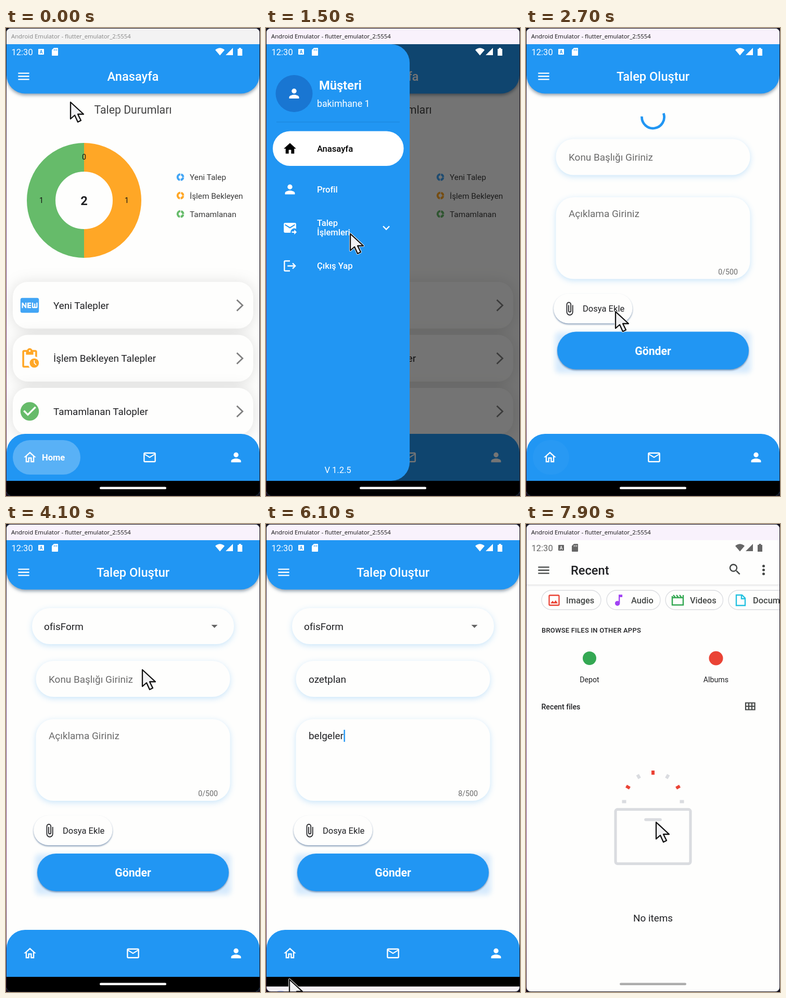
Write an HTML page that moves like this. It is 488 px wide and 896 px high and loops after 8 s.

```html
<!DOCTYPE html>
<html lang="tr">
<head>
<meta charset="utf-8">
<title>Talep</title>
<style>
html, body { margin: 0; width: 100%; height: 100%; overflow: hidden; background: #15101c; }
svg { display: block; width: 488px; height: 896px; font-family: Roboto, sans-serif; }
text { white-space: pre; }
.head { filter: drop-shadow(0 3px 3px rgba(30, 60, 90, .5)); }
.card { filter: drop-shadow(0 2px 14px rgba(0, 0, 0, .13)); }
.glow { filter: drop-shadow(0 3px 6px rgba(33, 150, 243, .24)); }
.lift { filter: drop-shadow(0 2px 1.5px rgba(40, 80, 130, .55)); }
.halo { filter: blur(5px); }
</style>
</head>
<body>
<svg id="stage" viewBox="0 0 488 896"></svg>
<script>
const BLUE = '#2196f3', PAGE = '#fefefd', INK = '#202124', GREY = '#6b6b6b';
const GREEN = '#66bb6a', ORANGE = '#ffa726', KEY = '#1b1b1f', U = 1.1825, ROUND = 35.5;

const PATHS = {
  menu: 'M3 18h18v-2H3zM3 13h18v-2H3zM3 6v2h18V6z',
  home: 'M10 20v-6h4v6h5v-8h3L12 3 2 12h3v8z',
  homeLine: 'M12 5.69l5 4.5V18h-2v-6H9v6H7v-7.81zM12 3L2 12h3v8h6v-6h2v6h6v-8h3z',
  mail: 'M22 6c0-1.1-.9-2-2-2H4c-1.1 0-2 .9-2 2v12c0 1.1.9 2 2 2h16c1.1 0 2-.9 2-2zm-2 0l-8 5-8-5zm0 12H4V8l8 5 8-5z',
  person: 'M12 12a4 4 0 1 0 0-8 4 4 0 0 0 0 8zm0 2c-2.67 0-8 1.34-8 4v2h16v-2c0-2.66-5.33-4-8-4z',
  forward: 'M20 4H4c-1.1 0-2 .9-2 2v12c0 1.1.9 2 2 2h9v-1a6 6 0 0 1 9-5.2V6c0-1.1-.9-2-2-2zm0 4l-8 5-8-5V6l8 5 8-5zm-1 7l4 4-4 4v-3h-4v-2h4z',
  exit: 'M17 7l-1.4 1.4L18.2 11H8v2h10.2l-2.6 2.6L17 17l5-5zM4 5h8V3H4c-1.1 0-2 .9-2 2v14c0 1.1.9 2 2 2h8v-2H4z',
  fresh: 'M20 4H4a2 2 0 0 0-2 2v12a2 2 0 0 0 2 2h16a2 2 0 0 0 2-2V6a2 2 0 0 0-2-2zM8.5 15H7.3l-2.55-3.5V15H3.5V9h1.25l2.5 3.5V9H8.5zm5-4.74H11v1.12h2.5v1.26H11v1.11h2.5V15h-4V9h4zm7 3.74a1 1 0 0 1-1 1h-4a1 1 0 0 1-1-1V9h1.25v4.5h1.13V10h1.25v3.5h1.12V9h1.25z',
  pending: 'M17 12a5 5 0 1 0 0 10 5 5 0 0 0 0-10zm1.65 7.35L16.5 17.2V14h1v2.79l1.85 1.85zM18 3h-3.18a3 3 0 0 0-5.64 0H6a2 2 0 0 0-2 2v15a2 2 0 0 0 2 2h6.1a7 7 0 0 1-1.4-2H6V5h2v3h8V5h2v5.08c.7.1 1.4.3 2 .6V5a2 2 0 0 0-2-2zm-6 2a1 1 0 1 1 0-2 1 1 0 0 1 0 2z',
  done: 'M12 2a10 10 0 1 0 0 20 10 10 0 0 0 0-20zm-2 15l-5-5 1.4-1.4 3.6 3.6 7.6-7.6L19 8z',
  clip: 'M16.5 6v11.5a4 4 0 0 1-8 0V5a2.5 2.5 0 0 1 5 0v10.5a1 1 0 0 1-2 0V6H10v9.5a2.5 2.5 0 0 0 5 0V5a4 4 0 0 0-8 0v12.5a5.5 5.5 0 0 0 11 0V6z',
  mic: 'M12 14a3 3 0 0 0 3-3V5a3 3 0 0 0-6 0v6a3 3 0 0 0 3 3zM17 11a5 5 0 0 1-10 0H5a7 7 0 0 0 6 6.9V21h2v-3.1a7 7 0 0 0 6-6.9z',
  search: 'M15.5 14h-.8l-.3-.3a6.5 6.5 0 1 0-.7.7l.3.3v.8l5 5 1.5-1.5zm-6 0a4.5 4.5 0 1 1 0-9 4.5 4.5 0 0 1 0 9z',
  note: 'M12 3v10.55A4 4 0 1 0 14 17V7h4V3z'
};

const icon = (name, x, y, fill = '#fff', k = U) =>
  `<path d="${PATHS[name]}" fill="${fill}" fill-rule="evenodd" transform="translate(${x} ${y}) scale(${k}) translate(-12 -12)"/>`;
// y is the middle of the capitals
const text = (x, y, s, size, fill = '#fff', more = '') =>
  `<text x="${x}" y="${y + size * .355}" font-size="${size}" fill="${fill}" ${more}>${s}</text>`;
const rect = (x, y, w, h, r, fill, more = '') =>
  `<rect x="${x}" y="${y}" width="${w}" height="${h}" rx="${r}" fill="${fill}" ${more}/>`;
const disc = (x, y, r, fill, more = '') => `<circle cx="${x}" cy="${y}" r="${r}" fill="${fill}" ${more}/>`;
const line = (d, stroke, w = 2.4, more = '') =>
  `<path d="${d}" fill="none" stroke="${stroke}" stroke-width="${w}" ${more}/>`;
const group = (id, body, more = '') => `<g id="${id}" ${more}>${body}</g>`;
const MID = 'text-anchor="middle" ', MED = 'font-weight="500" ', BOLD = 'font-weight="700" ';

function homePage() {
  const legend = [['Yeni Talep', '#42a5f5'], ['İşlem Bekleyen', ORANGE], ['Tamamlanan', GREEN]];
  const cards = [['fresh', 'Yeni Talepler', '#42a5f5'], ['pending', 'İşlem Bekleyen Talepler', ORANGE],
    ['done', 'Tamamlanan Talopler', GREEN]];
  const ring = (y, c) => disc(335, y, 5.3, 'none',
    `stroke="${c}" stroke-width="4" stroke-dasharray="6.8 1.5 15.1 1.5 6.8 1.6" stroke-dashoffset="-.8"`);
  return text(244, 156, 'Talep Durumları', 21.28, '#444', MID) +
    line('M150 247.5a82.5 82.5 0 0 1 0 165', ORANGE, 55) + line('M150 247.5a82.5 82.5 0 0 0 0 165', GREEN, 55) +
    text(150, 247, '0', 14.19, '#111', MID) + text(68, 330, '1', 14.19, '#111', MID) +
    text(232, 330, '1', 14.19, '#111', MID) + text(150, 331, '2', 23.65, INK, MID + BOLD) +
    legend.map(([s, c], i) => ring(285.5 + i * 35.3, c) + text(353, 286 + i * 35.3, s, 15.37, '#3a3a3a')).join('') +
    cards.map((c, i) => rect(13, 486 + i * 101.5, 462, 89.5, 29, PAGE, 'class="card"')).join('') +
    cards.map(([n, s, c], i) => {
      const y = 531 + i * 101.5;
      return icon(n, 45.5, y, c, 1.774) + text(91, y, s, 18.92, INK) + line(`M443.5 ${y - 10.5}l11 10.5-11 10.5`, '#808080', 2.8);
    }).join('');
}

function formPage() {
  const field = (x, y, w, h) => rect(x, y, w, h, 34, PAGE, 'class="glow"');
  return rect(0, 31, 488, 836, 0, PAGE) + line('', BLUE, 4.73, 'id="spin"') +
    group('pick', field(50, 161, 388, 69) + text(73, 196, 'ofisForm', 18.92, INK) + '<path d="M394.5 193h12l-6 6z" fill="#666"/>') +
    group('fields',
      field(57.5, 262, 373, 69) + '<g id="subject"></g>' +
      field(57.5, 373.5, 373, 156.5) + '<g id="body"></g>' +
      text(407, 516, '', 14.19, GREY, 'id="count" text-anchor="end"') +
      rect(53, 558, 151.5, 57, 28.5, PAGE, 'class="lift"') + icon('clip', 83.5, 587, INK) + text(109, 587, 'Dosya Ekle', 16.55, INK) +
      rect(56, 632, 376, 78, 8, '#d6eafc', 'class="halo"') +
      rect(60, 631, 368, 72, 36, BLUE, 'class="lift"') + text(244, 667.5, 'Gönder', 21.28, '#fff', MID + BOLD));
}

function drawerPanel() {
  const item = (n, s, y) => icon(n, 46, y) + text(98, y, s, 16.55, '#fff', MED);
  return rect(-40, 31, 316, 836, ROUND, BLUE) +
    disc(54, 125.5, 35.5, '#1976d2') + icon('person', 54, 125.5) +
    text(102, 110, 'Müşteri', 23.65, '#fff', BOLD) + text(98, 145, 'bakimhane 1', 17.74) +
    line('M20 180H257', '#1c85da', 1.2) +
    rect(13, 197.5, 251.5, 66.5, 33, '#fff') + icon('home', 46, 231, '#000') + text(98, 231, 'Anasayfa', 16.55, '#000', MED) +
    item('person', 'Profil', 309) + icon('forward', 46, 382.5) +
    text(98, 373, 'Talep', 16.55, '#fff', MED) + text(98, 391.5, 'İşlemleri', 16.55, '#fff', MED) +
    line('M-6-3l6 6 6-6', '#fff', 2.4, 'id="more"') +
    group('sub', item('mail', 'Talepler', 460) + item('forward', 'Talep Oluştur', 533)) +
    group('exit', item('exit', 'Çıkış Yap', 455.5)) + text(138, 846, 'V 1.2.5', 16.55, '#fff', MID);
}

function keyboard() {
  const pale = '#dde2f9', mark = '#b5c6fc';
  let s = rect(0, 442, 488, 460, 0, '#f3eff4');
  const row = (keys, x, y, h) => [...keys].forEach((k, i) => {
    const kx = x + i * 48.2;
    s += rect(kx, y, 41.5, h, 7, '#fefefe') + text(kx + 20.75, y + h / 2 + (k > '9' ? 0 : 1.5), k, 32, KEY, MID);
  });
  row('1234567890', 6.5, 504, 53);
  row('qwertyuiop', 6.5, 566, 56);
  row('asdfghjkl', 30.6, 632, 56);
  row('zxcvbnm', 78.8, 699, 56);
  s += rect(6, 699, 66, 56, 7, pale) + line('M39 715l12 13h-6.5v10h-11v-10h-6.5z', KEY) +
    rect(415.5, 699, 66, 56, 7, pale) + line('M434 728l8-10.5h20v21h-20zM446 723l10 10M456 723l-10 10', KEY) +
    rect(6, 765, 66, 59, 29.5, '#c3c7db') + text(39, 796, '?123', 20, KEY, MID + MED) +
    rect(78.5, 765, 41.5, 59, 7, pale) + text(99.5, 800, ',', 28, KEY, MID) +
    rect(126.7, 765, 41.5, 59, 7, '#fefefe') + disc(147.5, 795, 11, 'none', `stroke="${KEY}" stroke-width="2.3"`) +
    disc(143.5, 791.5, 1.8, KEY) + disc(151.5, 791.5, 1.8, KEY) + line('M142 798q5.5 6 11 0', KEY) +
    rect(175, 765, 186, 59, 7, '#fefefe') + rect(367, 765, 42, 59, 7, pale) + text(388, 800, '.', 28, KEY, MID) +
    rect(415.5, 765, 66, 59, 29.5, mark) + line('M439 796l6.5 6.5 14-14', KEY, 2.6);
  s += disc(28, 468, 18, mark) + line('M31 462l-6 6 6 6', KEY) +
    line('M100 478H90q-3 0-3-3v-14q0-3 3-3h14q3 0 3 3v10zM100 478v-7h7M91 468q5 7 10 1M91 464h3M99 464h3', KEY, 2.3) +
    text(167, 468, 'GIF', 17, KEY, MID + 'font-weight="900" letter-spacing="1"') +
    line('M227 460h17v18h-17zM231 466h9M231 470h9M231 474h6M232 458.5h7', KEY, 2.2) +
    disc(305, 468, 6, 'none', `stroke="${KEY}" stroke-width="5"`) +
    disc(305, 468, 8.8, 'none', `stroke="${KEY}" stroke-width="4" stroke-dasharray="5.2 4.015"`) +
    line('M348 456v25', '#c2c3d3', 1.4) +
    [383, 390, 397].map(x => disc(x, 468, 2.3, KEY)).join('') + icon('mic', 460, 468, KEY) +
    line('M46 864l6 6 6-6', '#444', 1.8) + rect(180, 878.5, 128, 4.5, 2.2, '#e8e4e9') +
    line('M427 863h18M427 867h18', '#555', 2.2, 'stroke-dasharray="2.4 1.5"') + line('M431 871.5h10', '#555', 2);
  return s;
}

function picker() {
  const chip = (x, w, s, tx) => rect(x, 127, w, 37, 18.5, PAGE, 'stroke="#dadce0" stroke-width="1.3"') +
    text(tx, 146, s, 16.4, '#444746', MED);
  const ticks = Array.from({ length: 7 }, (_, i) =>
    rect(241, 472, 6, 8, 0, [1, 3, 5].includes(i) ? '#ea4335' : '#dadce0', `transform="rotate(${i * 30 - 90} 244 531.5)"`)).join('');
  return rect(0, 31, 488, 865, 0, PAGE) + rect(0, 116, 488, 1.5, 0, '#e3e3e3') + rect(0, 117.5, 488, 2, 0, '#f5f5f5') +
    icon('menu', 34, 88.5, '#444746') + text(86, 89, 'Recent', 23.65, INK, MED) + icon('search', 401.5, 87, '#444746') +
    [80.5, 88, 95.5].map(y => disc(456.5, y, 2.5, '#444746')).join('') +
    chip(30, 114, 'Images', 77) + chip(155, 103, 'Audio', 202) + chip(268, 110.5, 'Videos', 315) + chip(389, 140, 'Documents', 436) +
    rect(44.5, 136.5, 19, 19, 1.5, 'none', 'stroke="#ea4335" stroke-width="2.3"') + '<path d="M47 152l4-5 3 3 3-4 4 6z" fill="#ea4335"/>' +
    icon('note', 178, 146, '#a142f4') +
    line('M281 138v17h21v-14h-21M283 136l4 5M289 136l4 5M295 136l4 5M302 136v6', '#34a853', 2.5) +
    line('M404 136h11l6 6v14h-17zM414 136v7h7', '#24c1e0', 2.4) +
    text(30, 203, 'BROWSE FILES IN OTHER APPS', 13, INK, MED + 'letter-spacing=".23"') +
    disc(122, 257, 13, '#34a853') + disc(365, 257, 13.5, '#ea4335') +
    text(122, 298, 'Depot', 14.19, INK, MID) + text(365, 298, 'Albums', 14.19, INK, MID) +
    text(29.5, 350, 'Recent files', 14.19, INK, MED) +
    line('M422 342.5h17.5v13H422zM422 349h17.5M428 342.5v13M434 342.5v13', '#444746', 2.2) +
    ticks + rect(172, 546.3, 144, 104, 4, 'none', 'stroke="#dadce0" stroke-width="5.2"') +
    line('M230 566h28', '#dadce0', 5.6, 'stroke-linecap="round"') +
    text(244, 754, 'No items', 18.92, INK, MID) + rect(180, 878.5, 128, 4.5, 2.2, '#acacac');
}

const statusBar = text(10.5, 46, '12:30', 16.55, 'currentColor') + rect(62, 40, 11, 11, 1, 'currentColor') +
  text(67.5, 45.7, 'A', 8.5, 'var(--back)', MID + BOLD) +
  '<path fill="currentColor" d="M92 38h7q1 0 1 1v13q0 1-1 1H89q-1 0-1-1V42zM402 42q9-7.5 18 0l-9 10.5zM422 52l14-14v14zM447.5 38h4v2h2.5v13h-9V40h2.5z"/>' +
  line('M92.5 40.5v3M95 40.5v3M97.5 40.5v3', 'var(--back)', 1);

const ARROW = 'd="M1 1V33l8-7 6 13 6-3-6-12h11z" fill="#f1f1f3" stroke-linejoin="round"';

const stage = document.getElementById('stage');
stage.innerHTML = `<defs>
  <clipPath id="win"><rect x="1" y="1" width="486" height="894" rx="8"/></clipPath>
  <linearGradient id="edge" x2="0" y2="1"><stop stop-color="#1b1a24"/><stop offset=".4" stop-color="#6d3f7c"/>
    <stop offset=".75" stop-color="#7d3a72"/><stop offset="1" stop-color="#2a1024"/></linearGradient></defs>` +
  rect(0, 0, 2, 896, 0, 'url(#edge)') +
  group('window', rect(0, 0, 488, 896, 0, PAGE) +
    group('home', homePage()) + group('form', formPage()) +
    rect(1, -20, 486, 145.5, ROUND, BLUE, 'class="head"') + icon('menu', 34, 92.5) +
    text(244, 93, 'Anasayfa', 23.65, '#fff', MID + MED + 'id="titleA"') +
    text(244, 93, 'Talep Oluştur', 23.65, '#fff', MID + MED + 'id="titleB"') +
    rect(1, 777, 486, 150, ROUND, BLUE) + rect(13, 789, 130, 66, 33, '#fff', 'id="pill"') +
    icon('homeLine', 46, 822) + text(69, 822, 'Home', 16.55, '#fff', BOLD + 'id="label"') +
    group('post', icon('mail', 0, 822)) + icon('person', 442, 822) +
    rect(0, 867, 488, 30, 0, '#000') + rect(180, 878.5, 128, 4.5, 2.2, '#fff', 'id="bar"') +
    group('menu', rect(0, 31, 488, 836, 0, '#000', 'id="scrim"') + group('drawer', drawerPanel())) +
    group('keys', keyboard()) + group('picker', picker()) + group('status', statusBar) +
    rect(0, 0, 488, 31, 0, '#f9f2fc', 'id="bartop"') +
    text(10, 16, 'Android Emulator - flutter_emulator_2:5554', 11.34, '#111', 'id="caption" font-family="Open Sans, sans-serif"') +
    group('cursor', `<path ${ARROW} stroke="#fff" stroke-width="4"/><path ${ARROW} stroke="#111" stroke-width="2.3"/>`),
    'clip-path="url(#win)"');

const $ = {};
stage.querySelectorAll('[id]').forEach(e => $[e.id] = e);
const set = (id, o) => { for (const k in o) $[id].setAttribute(k, o[k]); };
const show = (id, a) => set(id, { opacity: a, display: a > 0 ? 'inline' : 'none' });
const ramp = (t, a, b) => Math.min(1, Math.max(0, (t - a) / (b - a)));
const smooth = p => p * p * (3 - 2 * p);
const out = (p, n = 3) => 1 - (1 - p) ** n;

// time, x, y of the pointer tip
const TRAIL = [[0, 123, 141], [100, 123, 141], [800, 34, 92], [1000, 34, 92], [1500, 161, 393], [1700, 161, 393],
  [2400, 171, 542], [3450, 171, 542], [4100, 261, 278], [4350, 262, 310], [5000, 262, 310], [5350, 190, 400],
  [5550, 190, 400], [5950, 44, 871], [6150, 44, 871], [6900, 125, 585], [7250, 125, 585], [7850, 249, 570]];

function pointer(t) {
  const i = TRAIL.findIndex(k => k[0] > t);
  if (i < 0) return TRAIL.at(-1).slice(1);
  const [a, b] = [TRAIL[i - 1], TRAIL[i]], p = smooth(ramp(t, a[0], b[0]));
  return [a[1] + (b[1] - a[1]) * p, a[2] + (b[2] - a[2]) * p];
}

// the head runs ahead for half a turn, then the tail catches up
function spinner(t) {
  const n = (t - 2367) / 1333, turn = Math.floor(n), p = n - turn;
  const head = out(ramp(p, 0, .5), 2), tail = out(ramp(p, .5, 1), 2);
  const a = (-90 + (t - 2367) * .21 + (turn + tail) * 270) * Math.PI / 180;
  const sweep = Math.max(.02, (head - tail) * 1.5 * Math.PI);
  const at = q => `${244 + 21.5 * Math.cos(q)} ${170.5 + 21.5 * Math.sin(q)}`;
  return `M${at(a)}A21.5 21.5 0 ${sweep > Math.PI ? 1 : 0} 1 ${at(a + sweep)}`;
}

function entry(id, y, value, hint, caret) {
  $[id].innerHTML = text(82, y, value || hint, 18.92, value ? INK : GREY);
  if (!caret) return;
  const x = value ? 82.5 + $[id].firstChild.getComputedTextLength() : 82;
  $[id].innerHTML += rect(x, y - 11, 2.4, 23, 0, BLUE);
}

function draw(t) {
  const focused = t >= 100, page = ramp(t, 2520, 2680), open = out(ramp(t, 850, 1150));
  set('bartop', { fill: focused ? '#f9f2fc' : '#f3f3f3' });
  set('caption', { fill: focused ? '#111' : '#858585' });
  show('form', page);
  show('titleA', 1 - page);
  show('titleB', page);

  const unfold = smooth(ramp(t, 1680, 1950));
  show('menu', open > 0 ? 1 - page : 0);
  set('scrim', { opacity: .54 * open });
  set('drawer', { transform: `translate(${-277 * (1 - open)} 0)` });
  set('more', { transform: `translate(231 382.5) rotate(${180 * unfold})` });
  set('exit', { transform: `translate(0 ${150 * unfold})` });
  show('sub', ramp(unfold, .4, 1));

  const wide = 1 - out(ramp(t, 2520, 2820));
  set('pill', { width: 66 + 64 * wide, opacity: .25 * Math.min(1, wide * 2) });
  show('label', ramp(wide, .5, 1));
  set('post', { transform: `translate(${244 + 32 * wide} 0)` });

  const loaded = t >= 3480;
  show('pick', +loaded);
  show('spin', +!loaded);
  set('spin', { d: spinner(t) });
  set('fields', { transform: `translate(0 ${loaded ? 0 : -49.5})` });
  const typed = (s, a, b) => s.slice(0, Math.floor(ramp(t, a, b) * s.length));
  const note = typed('belgeler', 5540, 5860), blink = (t - 5540) % 1000 < 620;
  entry('subject', 297, typed('ozetplan', 4840, 5300), 'Konu Başlığı Giriniz', t > 4840 && t < 5400);
  entry('body', 405, note, 'Açıklama Giriniz', t >= 5400 && (t < 5900 || blink));
  $.count.textContent = note.length + '/500';

  const up = out(ramp(t, 4450, 4750)) * (1 - out(ramp(t, 5920, 6170)));
  show('keys', +(up > 0));
  set('keys', { transform: `translate(0 ${453 * (1 - up)})` });
  show('bar', +(up === 0));

  const files = ramp(t, 7180, 7380);
  show('picker', files);
  set('picker', { transform: `translate(0 ${40 * (1 - out(files))})` });
  $.status.style.color = files > .5 ? '#666' : '#fff';
  $.status.style.setProperty('--back', files > .5 ? PAGE : BLUE);
  set('cursor', { transform: `translate(${pointer(t)})` });
}

function tick() {
  draw(performance.now() % 8000);
  requestAnimationFrame(tick);
}
tick();
</script>
</body>
</html>
```
